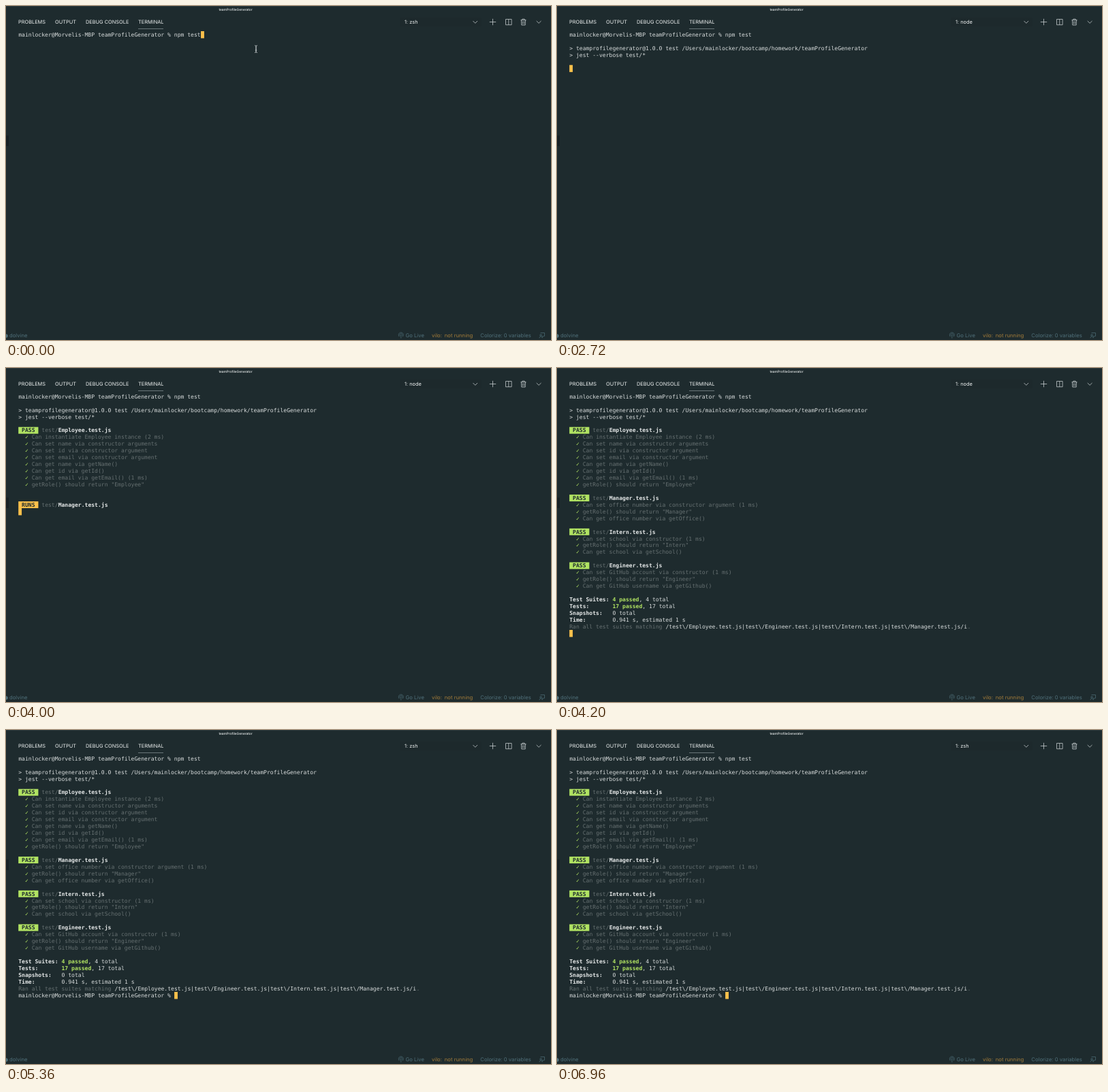
Write an HTML page that moves like this. It is 800 px wide and 491 px high and loops after 7 s.

```html
<!DOCTYPE html>
<html lang="en">
<head>
<meta charset="utf-8">
<title>Terminal test run</title>
<style>
  html, body { margin: 0; width: 100%; height: 100%; overflow: hidden; background: #1e2b2e; }
  svg { display: block; width: 800px; height: 491px; }
  text { white-space: pre; text-rendering: geometricPrecision; }
  .ui { font: 7.4px Inter, sans-serif; fill: #eef1f1; }
  .status { font: 7.7px Inter, sans-serif; fill: #50707a; }
  .mono { font: 8.09px "DejaVu Sans Mono", monospace; }
  .plain { fill: #d9dddd; }
  .bold { fill: #e4e7e7; font-weight: bold; }
  .dim { fill: #667071; }
  .ok { fill: #b1e362; }
  .passed { fill: #b1e362; font-weight: bold; }
  .badge { fill: #1e2b2e; font-weight: bold; }
  .icon { fill: none; stroke: #c3cacc; stroke-width: .8; }
  .soft { stroke: #50707a; stroke-width: .7; }
</style>
</head>
<body>
<svg viewBox="0 0 800 491">
  <rect width="800" height="491" fill="#1e2b2e"/>
  <rect width="800" height="1" fill="#2b383c"/>
  <rect y="190.5" width="4" height="15.5" fill="#172125"/>
  <text x="337" y="6.8" text-anchor="middle" class="ui" style="font-size:4.8px;font-weight:500">teamProfileGenerator</text>
  <g class="ui">
    <text x="18" y="26.4">PROBLEMS</text>
    <text x="72" y="26.4">OUTPUT</text>
    <text x="117" y="26.4">DEBUG CONSOLE</text>
    <text x="194" y="26.4">TERMINAL</text>
    <rect x="194" y="33" width="37" height=".8" fill="#7d898c"/>
    <rect x="578" y="17" width="120" height="13" fill="#1d292c"/>
    <text id="shell" x="585" y="26.4"></text>
  </g>
  <g class="icon">
    <path d="M685.5 22l3.3 3.3 3.3-3.3M778.7 22l3.4 3.3 3.4-3.3M714.5 18.8v9.4M709.8 23.5h9.4"/>
    <path d="M733.5 19.5h8.6v8.2h-8.6zM737.8 19.5v8.2"/>
    <path d="M755.5 20.7h8M757.8 20.7v-1.5h3.4v1.5M756.4 20.7l.4 7.3h5.4l.4-7.3M758.4 22.3v4.2M760.6 22.3v4.2"/>
  </g>
  <g class="status">
    <circle cx="0" cy="485" r="2.8"/>
    <text x="5" y="487.2">dolvine</text>
    <text x="586.5" y="487.2">Go Live</text>
    <text x="696.3" y="487.2">Colorize: 0 variables</text>
    <g fill="#a37c3a">
      <text x="625" y="487.2">vilo:</text>
      <text x="643.8" y="487.2">not running</text>
    </g>
    <path class="icon soft" d="M577.6 486.2a3.5 3.5 0 1 1 4.4 0M578.6 484.8a1.8 1.8 0 1 1 2.4 0M579.8 483.6v5"/>
    <path class="icon soft" d="M784.5 480.5h6v4.8h-1.4l-1.6 1.5v-1.5M783 488.2c0-3.2 4.2-3.2 4.2 0"/>
    <circle class="icon soft" cx="785.1" cy="484" r="1.3"/>
  </g>
  <g id="screen" class="mono"></g>
  <path id="pointer" class="icon" d="M365 58q2 0 2 1.3v8q0 1.3-2 1.3M369 58q-2 0-2 1.3v8q0 1.3 2 1.3M365.8 65h2.4"/>
</svg>
<script>
const LOOP = 7000, LEFT = 18.2, COL = 4.87, TOP = 37, ROW = 9.943;
const GREEN = '#b1e362', YELLOW = '#fbc04b';
const PROMPT = 'mainlocker@Morvelis-MBP teamProfileGenerator % ';
const $ = id => document.getElementById(id);

const block = (row, col, width, color, height = ROW) =>
  `<rect x="${LEFT + col * COL}" y="${TOP + row * ROW}" width="${width * COL}" height="${height}" fill="${color}"/>`;

// Each part is [style, text]; parts follow one another on the character grid.
function line(row, ...parts) {
  let col = 0;
  return parts.map(([style, text]) => {
    const x = LEFT + col * COL;
    col += text.length;
    return `<text class="${style}" x="${x}" y="${TOP + row * ROW + 7.7}">${text}</text>`;
  }).join('');
}

const cursor = (row, col) => block(row, col, 1, YELLOW, 10.4);

const heading = (row, label, color, name) => block(row, 0, 6, color) +
  line(row, ['badge', ` ${label} `], ['dim', ' test/'], ['bold', `${name}.test.js`]);

const running = (row, name) => heading(row, 'RUNS', YELLOW, name) + cursor(row + 1, 0);

const suite = (row, name, tests) => heading(row, 'PASS', GREEN, name) +
  tests.map((test, i) => line(row + 1 + i, ['ok', '  ✓ '], ['dim', test])).join('');

const command = line(0, ['plain', PROMPT + 'npm test']);

const header =
  line(2, ['plain', '> teamprofilegenerator@1.0.0 test /Users/mainlocker/bootcamp/homework/teamProfileGenerator']) +
  line(3, ['plain', '> jest --verbose test/*']);

const employee = suite(5, 'Employee', [
  'Can instantiate Employee instance (2 ms)',
  'Can set name via constructor arguments',
  'Can set id via constructor argument',
  'Can set email via constructor argument',
  'Can get name via getName()',
  'Can get id via getId()',
  'Can get email via getEmail() (1 ms)',
  'getRole() should return "Employee"'
]);

const others = suite(15, 'Manager', [
  'Can set office number via constructor argument (1 ms)',
  'getRole() should return "Manager"',
  'Can get office number via getOffice()'
]) + suite(20, 'Intern', [
  'Can set school via constructor (1 ms)',
  'getRole() should return "Intern"',
  'Can get school via getSchool()'
]) + suite(25, 'Engineer', [
  'Can set GitHub account via constructor (1 ms)',
  'getRole() should return "Engineer"',
  'Can get GitHub username via getGithub()'
]);

const summary =
  line(30, ['bold', 'Test Suites: '], ['passed', '4 passed'], ['plain', ', 4 total']) +
  line(31, ['bold', 'Tests:       '], ['passed', '17 passed'], ['plain', ', 17 total']) +
  line(32, ['bold', 'Snapshots:   '], ['plain', '0 total']) +
  line(33, ['bold', 'Time:        '], ['plain', '0.941 s, estimated 1 s']) +
  line(34, ['dim', 'Ran all test suites matching '],
    ['plain', '/' + ['Employee', 'Engineer', 'Intern', 'Manager'].map(n => `test\\/${n}.test.js`).join('|') + '/i'],
    ['dim', '.']);

const results = command + header + employee + others + summary;

// [start time, terminal contents]
const stages = [
  [0, command + cursor(0, 55)],
  [2440, command + cursor(1, 0)],
  [2720, command + header + cursor(5, 0)],
  [3160, command + header + running(6, 'Employee')],
  [3920, command + header + employee + running(16, 'Manager')],
  [4160, results + cursor(35, 0)],
  [4280, results + line(35, ['plain', PROMPT]) + cursor(35, PROMPT.length)]
];

let shown = null;
function draw(t) {
  const stage = stages.filter(([start]) => t >= start).pop();
  if (stage !== shown) {
    $('screen').innerHTML = stage[1];
    shown = stage;
  }
  $('shell').textContent = t >= 2480 && t < 4320 ? '1: node' : '1: zsh';
  $('pointer').style.display = t < 480 ? '' : 'none';
}

const began = performance.now();
function tick() {
  draw((performance.now() - began) % LOOP);
  requestAnimationFrame(tick);
}
tick();
</script>
</body>
</html>
```
